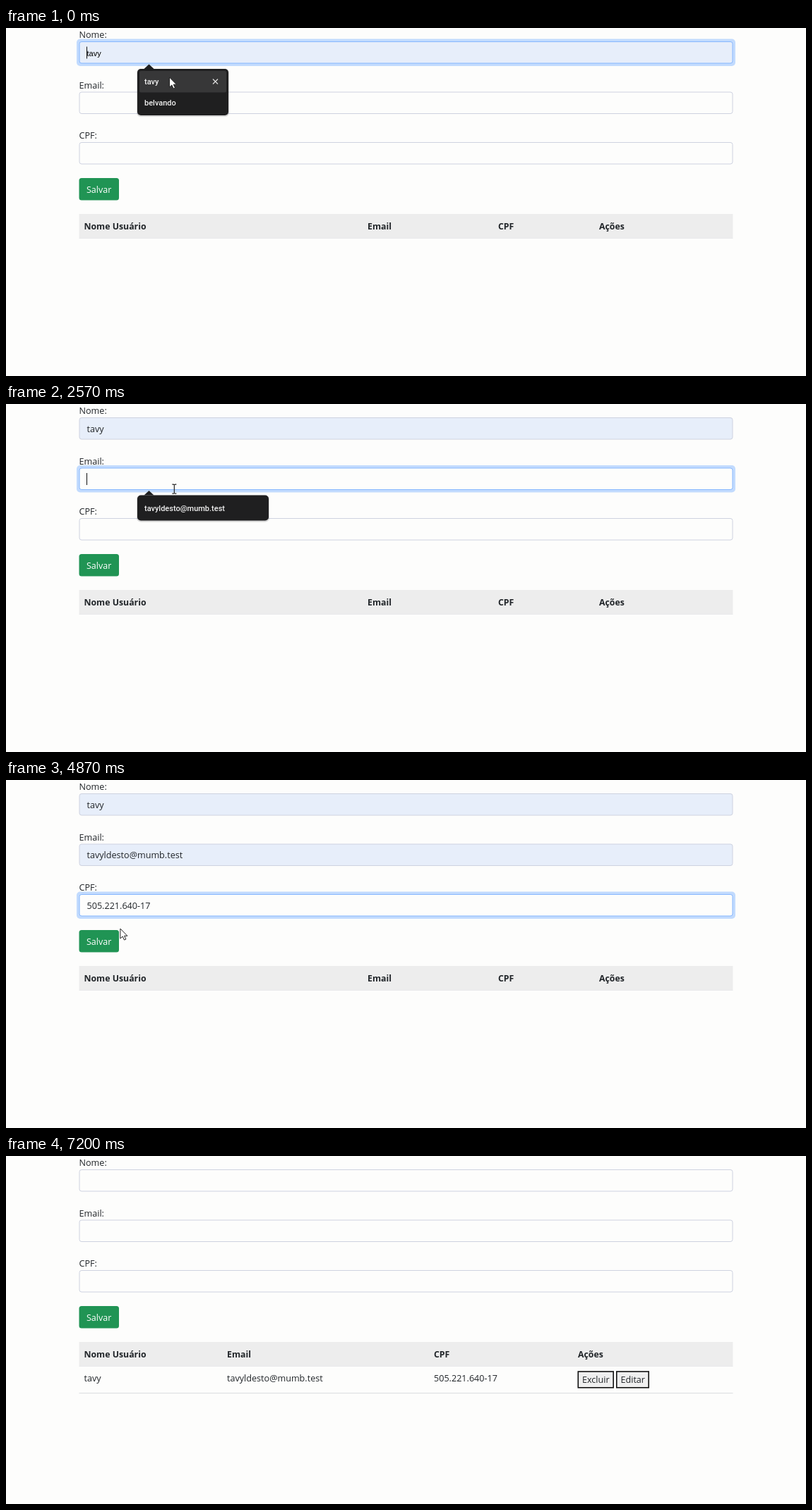
An HTML page that plays this animation: 1133x494 px, repeating every 7230 ms.

```html
<!DOCTYPE html>
<html lang="pt-BR">
<head>
<meta charset="utf-8">
<title>Cadastro de usuários</title>
<style>
  html, body { margin: 0; width: 100%; height: 100%; overflow: hidden; background: #fdfdfc; }
  svg { display: block; width: 1133px; height: 494px; }
  text { font: 12.6px "Open Sans", sans-serif; fill: #212529; white-space: pre; }
  .head { font-size: 12.3px; font-weight: 700; }
  .preview { font: 11px "Liberation Sans", Arial, sans-serif; fill: #000; }
  .item { font: 500 11px Roboto, sans-serif; fill: #f1f1f1; }
  .save { font-size: 12.5px; fill: #fff; }
</style>
</head>
<body>
<svg id="stage" viewBox="0 0 1133 494"></svg>
<script>
const LOOP = 7230, LEFT = 103.5, WIDTH = 926, FADE = 150;
const ROW_ADDED = 5600, SAVE_HOVER = 5000, SAVE_CLICK = 5200, SAVE_BLUR = 6700;

// Times: focus, preview (hover over the suggestion), fill, blur.
const fields = [
  { label: "Nome:", y: 19, value: "tavy", items: ["tavy", "belvando"], popupWidth: 129,
    focus: -1000, preview: -500, fill: 1100, blur: 2400, autofill: true },
  { label: "Email:", y: 90.5, value: "tavyldesto@mumb.test", items: ["tavyldesto@mumb.test"], popupWidth: 186,
    focus: 2400, preview: 2640, fill: 2980, blur: 3450, autofill: true },
  { label: "CPF:", y: 162, value: "505.221.640-17", items: ["505.221.640-17"], popupWidth: 150,
    focus: 3450, preview: 3760, fill: 3950, blur: SAVE_CLICK, autofill: false }
];

// Pointer path: time, x, y of the hot spot.
const path = [
  [0, 231.5, 70], [1200, 231.5, 70], [1900, 242, 104], [2420, 242, 104],
  [2800, 231.5, 152], [3120, 231.5, 152], [3400, 237, 175], [3550, 237, 175],
  [3850, 232, 222], [3970, 232, 222], [4200, 237, 175], [4500, 237, 175],
  [5050, 137, 223], [5640, 137, 223], [6000, 205, 223], [6100, 205, 223], [6550, 330, -24]
];

const stage = document.getElementById("stage");
const pen = document.createElement("canvas").getContext("2d");
const clamp = v => Math.max(0, Math.min(1, v));
const ease = v => v * v * (3 - 2 * v);
const fade = (t, on, off) => clamp((t - on) / FADE) * (1 - clamp((t - off) / FADE));
const within = (t, from, to) => t >= from && t < to;

const text = (x, y, s, cls = "") => `<text x="${x}" y="${y}" class="${cls}">${s}</text>`;
const rect = (x, y, w, h, fill, more = "") =>
  `<rect x="${x}" y="${y}" width="${w}" height="${h}" fill="${fill}" ${more}/>`;

function textWidth(s) {
  pen.font = '12.6px "Open Sans", sans-serif';
  return pen.measureText(s).width;
}

function mix(a, b, k) {
  return `rgb(${a.map((v, i) => Math.round(v + (b[i] - v) * k))})`;
}

function field(f, t) {
  const glow = fade(t, f.focus, f.blur);
  const previewing = within(t, f.preview, f.fill);
  const filled = within(t, f.fill, ROW_ADDED);
  const blue = previewing || (filled && f.autofill);
  let out = text(LEFT, f.y - 5, f.label);
  if (glow) {
    out += rect(LEFT - 3.5, f.y - 3.5, WIDTH + 7, 38.5, "#c2dbfe", `rx="5" opacity="${glow}"`);
  }
  out += rect(LEFT + .5, f.y + .5, WIDTH - 1, 30.5, blue ? "#e7eefa" : "#fdfdfc",
    `rx="3" stroke="${mix([206, 210, 224], [134, 183, 254], glow)}"`);
  if (previewing) out += text(114.5, f.y + 21, f.value, "preview");
  if (filled) out += text(114.5, f.y + 20.7, f.value);

  const phaseStart = t >= f.fill ? f.fill : Math.max(f.focus, 0);
  if (within(t, f.focus, f.blur) && Math.floor((t - phaseStart) / 530) % 2 === 0) {
    const x = 114 + (filled ? textWidth(f.value) + .5 : 0);
    out += rect(x, f.y + 7.5, 1, 17, "#111");
  }
  return out;
}

function popup(f, t) {
  if (!within(t, f.focus + 50, f.fill)) return "";
  const y = f.y + 39, height = f.items.length * 30 + 6;
  const right = 186 + f.popupWidth;
  let out = rect(185, y, f.popupWidth + 2, height + 2, "#000", 'rx="6" opacity=".15"') +
    rect(186, y, f.popupWidth, height, "#1f1f20", 'rx="5"') +
    `<path d="M195.5 ${y}l7-6.5 7 6.5z" fill="#1f1f20"/>`;
  if (t >= f.preview) {
    out += rect(189, y + 3, f.popupWidth - 6, 30.5, "#373738", 'rx="2"') +
      `<path d="M${right - 22} ${y + 14.5}l7 7m0-7l-7 7" stroke="#ddd" stroke-width="1.2"/>`;
  }
  f.items.forEach((s, i) => out += text(196, y + 22 + i * 30, s, "item"));
  return out;
}

function saveButton(t) {
  const dark = fade(t, SAVE_HOVER, SAVE_BLUR);
  const ring = fade(t, SAVE_CLICK, SAVE_BLUR);
  return rect(LEFT - 3, 209.8, 62.5, 38, "#94cdb0", `rx="6" opacity="${ring}"`) +
    rect(LEFT, 213, 56.5, 31.5, mix([32, 148, 84], [24, 123, 70], dark), 'rx="3.5"') +
    text(114, 233.7, "Salvar", "save");
}

function table(t) {
  const added = t >= ROW_ADDED;
  const columns = added ? [110.5, 313, 606, 810] : [110.5, 512, 697, 840];
  let out = rect(LEFT, 264, WIDTH, 34.5, "#ededed") + rect(LEFT, 298, WIDTH, .7, "#e3e4e8");
  ["Nome Usuário", "Email", "CPF", "Ações"].forEach((s, i) => out += text(columns[i], 286, s, "head"));
  if (!added) return out;
  fields.forEach((f, i) => out += text(columns[i], 320, f.value));
  const action = (x, w, s) =>
    rect(x + .8, 306, w - 1.6, 22.8, "#efefef", 'stroke="#111" stroke-width="1.6"') + text(x + 6.5, 322.3, s);
  return out + action(809.5, 51.5, "Excluir") + action(864, 47, "Editar") +
    rect(LEFT, 336.2, WIDTH, 1, "#d9dcdf");
}

function pointerAt(t) {
  const next = path.findIndex(p => p[0] > t);
  if (next < 0) return null;
  const [t0, x0, y0] = path[next - 1], [t1, x1, y1] = path[next];
  const k = ease((t - t0) / (t1 - t0));
  return [x0 + (x1 - x0) * k, y0 + (y1 - y0) * k];
}

const shapes = {
  arrow: '<path d="M0 0V14L3.3 11 5.6 16 8 15 5.7 10.2H10z" fill="#fff" stroke="#222" stroke-width="1"/>',
  beam: '<path d="M-3-6.5H-1L0-5.8 1-6.5H3M0-5.8V5.8M-3 6.5H-1L0 5.8 1 6.5H3" fill="none" stroke="#222" stroke-width="1.2"/>',
  hand: '<path d="M-2 1C-2-1 1-1 1 1V6.5C2 5.5 3.7 6 3.8 7.3 5 6.5 6.3 7.2 6.4 8.3 7.6 7.8 8.7 8.5 8.7 9.8V13' +
    'C8.7 15.5 7 16 7 18.5H-.5C-1-.0-1 16-4.8 11.5-6 9.8-4 8.5-2 10.5z" fill="#fff" stroke="#222" stroke-width=".9"/>'
};
shapes.hand = shapes.hand.replace("C-1-.0-1 16-4.8 11.5", "C-.5 16-3 14.5-4.8 11.5");

function pointer(t) {
  const at = pointerAt(t);
  if (!at) return "";
  const [x, y] = at;
  const inside = (left, top, w, h) => x >= left && x <= left + w && y >= top && y <= top + h;
  const overPopup = fields.some(f => within(t, f.focus + 50, f.fill) &&
    inside(186, f.y + 39, f.popupWidth, f.items.length * 30 + 6));
  let kind = "arrow";
  if (!overPopup && fields.some(f => inside(LEFT, f.y, WIDTH, 31))) kind = "beam";
  if (inside(LEFT, 213, 56.5, 31)) kind = "hand";
  return `<g transform="translate(${x} ${y})">${shapes[kind]}</g>`;
}

function draw(t) {
  stage.innerHTML = rect(0, 0, 1133, 494, "#fdfdfc") +
    fields.map(f => field(f, t)).join("") + saveButton(t) + table(t) +
    fields.map(f => popup(f, t)).join("") + pointer(t);
}

const start = performance.now();
function tick() {
  draw((performance.now() - start) % LOOP);
  requestAnimationFrame(tick);
}
tick();
</script>
</body>
</html>
```
